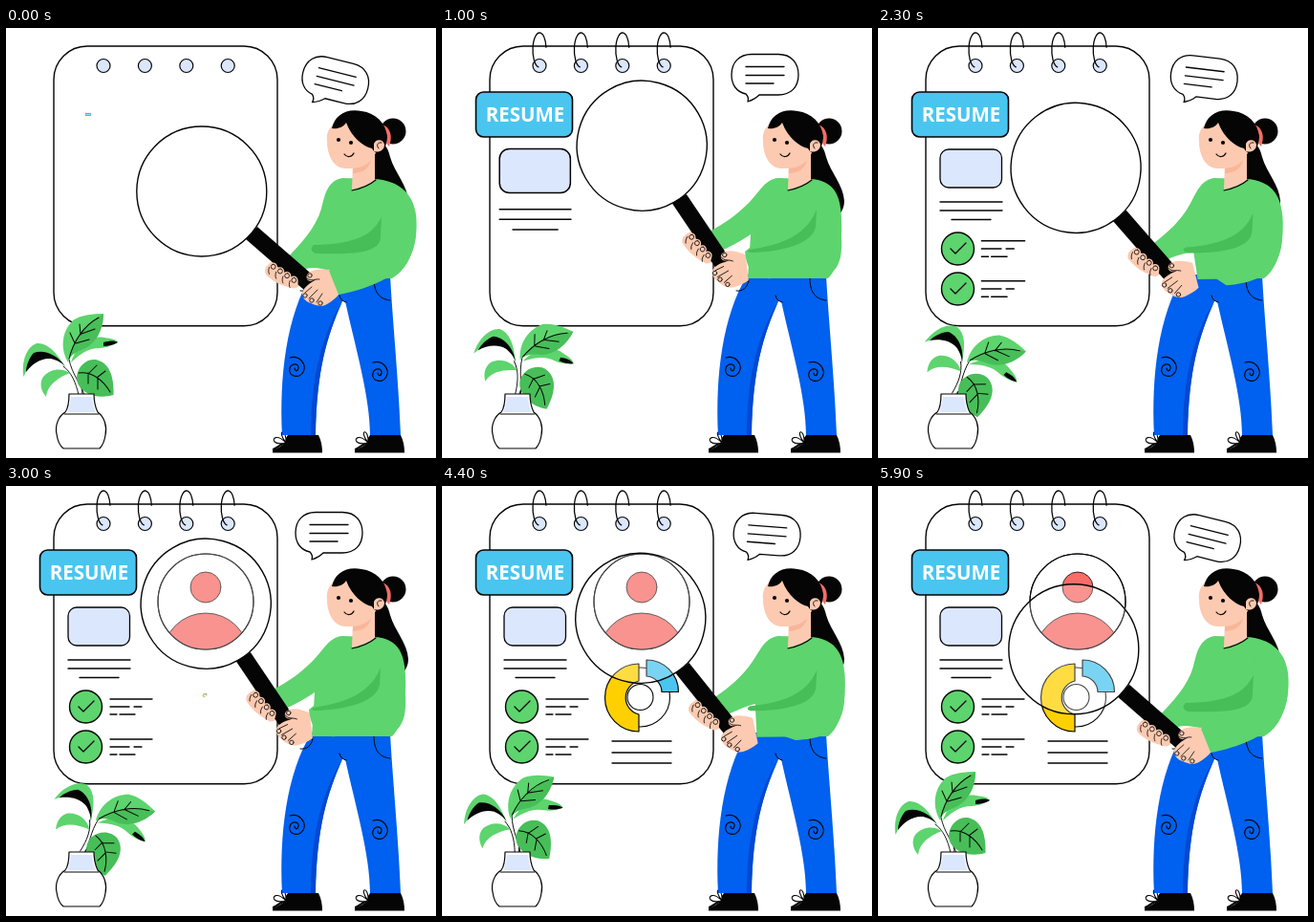
Recreate the animation shown at these times as an HTML page with a canvas. Size 450 by 450 pixels, loop 6000 ms.

```html
<!DOCTYPE html>
<html lang="en">
<head>
<meta charset="utf-8">
<title>Resume review</title>
<style>
html, body { margin: 0; width: 100%; height: 100%; overflow: hidden; background: #fff; }
canvas { display: block; width: 450px; height: 450px; }
</style>
</head>
<body>
<canvas id="stage" width="450" height="450"></canvas>
<script>
const ctx = document.getElementById('stage').getContext('2d');
const LOOP = 6000, TAU = Math.PI * 2, DEG = Math.PI / 180;
const INK = '#050505', GREEN = '#5dd46d', SHADE = '#47be58', SKIN = '#fccab1';
const BLUE = '#0060ef', SKY = '#4ac5f0', PALE = '#dbe7fd', RED = '#f76d68', YELLOW = '#ffd000';

const lerp = (a, b, k) => a + (b - a) * k;
const clamp = v => Math.min(1, Math.max(0, v));

// cubic-bezier(.25, .1, .25, 1), solved by bisection
function ease(x) {
  const curve = (p, q, s) => 3 * p * s * (1 - s) ** 2 + 3 * q * s * s * (1 - s) + s ** 3;
  let lo = 0, hi = 1;
  for (let i = 0; i < 20; i++) {
    const mid = (lo + hi) / 2;
    if (curve(.25, .25, mid) < x) lo = mid; else hi = mid;
  }
  return curve(.1, 1, lo);
}

// Alternates 0 -> 1 -> 0, easing each leg
function swing(t, leg) {
  const k = ease((t % leg) / leg);
  return Math.floor(t / leg) % 2 ? 1 - k : k;
}

function paint(path, fill, stroke, width = 1.3) {
  if (fill) { ctx.fillStyle = fill; ctx.fill(path); }
  if (stroke) { ctx.strokeStyle = stroke; ctx.lineWidth = width; ctx.stroke(path); }
}
const shape = (d, fill, stroke, width) => paint(new Path2D(d), fill, stroke, width);
const line = (d, width = 1.3) => shape(d, null, INK, width);

function circle(x, y, r, fill, stroke, width) {
  const p = new Path2D();
  p.arc(x, y, r, 0, TAU);
  paint(p, fill, stroke, width);
}

function box(x, y, w, h, r, fill, stroke, width) {
  const p = new Path2D();
  p.roundRect(x, y, w, h, r);
  paint(p, fill, stroke, width);
}

function group(draw) {
  ctx.save();
  draw();
  ctx.restore();
}

function turn(x, y, angle) {
  ctx.translate(x, y);
  ctx.rotate(angle);
  ctx.translate(-x, -y);
}

// Blends two path strings of the same structure
function morph(a, b, k) {
  const target = b.match(/[\d.]+/g);
  let i = 0;
  return a.replace(/[\d.]+/g, n => lerp(+n, +target[i++], k).toFixed(2));
}

// Scales in around a point, overshooting before it settles
function pop(t, start, x, y, draw) {
  if (t < start) return;
  const u = clamp((t - start) / 600), peak = 2 / 3;
  const s = u < peak
    ? Math.max(.06, 1.15 * ease(u / peak))
    : lerp(1.15, 1, ease((u - peak) / (1 - peak)));
  group(() => {
    ctx.translate(x, y);
    ctx.scale(s, s);
    ctx.translate(-x, -y);
    draw();
  });
}

function pad(t) {
  box(50, 19, 234, 292.7, 35, '#fff', INK, 1.4);
  const grown = ease(clamp(t / 600));
  for (let i = 0; i < 4; i++) {
    const x = 102 + i * 43.4;
    circle(x, 39.5, 7, PALE, INK, 1.2);
    if (grown < .03) continue;
    const ring = new Path2D();
    ring.ellipse(x, 23, 7, 18, 0, Math.PI * .55, Math.PI * (.55 + 1.4 * grown));
    paint(ring, null, INK, 1.3);
  }
}

function tab() {
  box(35.5, 67, 101, 47, 8, SKY, INK, 1.6);
  ctx.fillStyle = '#fff';
  ctx.font = 'bold 20.5px "Open Sans", sans-serif';
  ctx.textAlign = 'center';
  ctx.textBaseline = 'alphabetic';
  ctx.fillText('RESUME', 87, 97.5);
}

function summary() {
  box(65, 127, 64.5, 40, 9, PALE, INK, 1.3);
  line('M65 182H130M65 191H130M77 200.5H118');
}

function check(y) {
  circle(83.5, y, 17, GREEN, INK, 1.4);
  line(`M76 ${y}L81 ${y + 5}L92 ${y - 6}`, 1.3);
}

const checkLines = y =>
  line(`M109 ${y - 8}H153M109 ${y}H129M134 ${y}H142M109 ${y + 8}H116M119 ${y + 8}H135`);

function portrait() {
  circle(209, 121, 50, '#fff', INK, 1.1);
  circle(209, 106, 16, RED, INK, .8);
  group(() => {
    ctx.beginPath();
    ctx.arc(209, 121, 50, 0, TAU);
    ctx.clip();
    circle(209, 178, 45, RED, INK, .8);
  });
  circle(209, 121, 50, null, INK, 1.1);
}

function donut() {
  circle(207.5, 221, 31, '#fff', INK, 1.1);
  circle(207.5, 221, 13.5, '#fff', INK, 1.1);
  shape('M206 186A35.5 35.5 0 0 0 206 257V239A18 18 0 0 1 206 204Z', YELLOW, INK, 1.2);
  shape('M214 182A33.5 33.5 0 0 1 247.5 215.5H230A17 17 0 0 0 214 199Z', SKY, INK, 1.2);
}

// Runs its drawing in the moving frame of the magnifier
function held(k, draw) {
  group(() => {
    ctx.translate(4.4 * k, -47.8 * k);
    turn(204.8, 171, 15 * k * DEG);
    draw();
  });
}

const lens = () => circle(204.8, 171, 68, 'rgba(255,255,255,.26)', INK, 1.4);
const handle = () => shape('M251 221L263 208L325 262L313 275Z', INK);

function farHand() {
  shape('M294 241C286 242 278 243 274 248C270 252 270 257 274 260C281 266 292 272 303 272C308 271 309 265 307 258L309 254Z', SKIN);
}

function fingertips() {
  for (let i = 0; i < 4; i++) {
    const x = 279.5 + i * 7.2, y = 249.5 + i * 4.7;
    box(x - 4.5, y - 4, 9, 13, 4.5, SKIN);
    box(x - 2.2, y - 2.2, 4.8, 5, 2.4, SKIN, INK, .8);
    line(`M${x - 4} ${y + 1}C${x - 5} ${y + 4} ${x - 5} ${y + 6} ${x - 4} ${y + 8}`, .8);
  }
}

function nearHand() {
  shape('M339 253C331 252 322 252 317 256C313 259 314 265 319 265L325 263C318 267 312 271 310 277C310 282 313 286 319 288C325 291 331 292 336 289C341 286 345 283 349 278Z', SKIN);
  line('M315 262C319 266 324 262 328 263M313 277L320 271M317 283L326 274M325 287L331 278', .8);
  for (const [x, y] of [[318, 259], [313, 280], [320, 285], [329, 288]])
    circle(x, y, 2.2, SKIN, INK, .8);
}

function bubble(k) {
  group(() => {
    ctx.translate(lerp(6.5, 0, k), lerp(5.8, 0, k));
    turn(338, 50, lerp(14, 0, k) * DEG);
    shape('M324 27.5H352C366 27.5 373 37 373 49C373 62 365 70 352 70H332C329 73 325 75.5 320 77C321 74 320 71 318 69C308 67 303 59 303 49C303 36 311 27.5 324 27.5Z', '#fff', INK, 1.3);
    line('M318 40.5H358M318 49.5H358M318 58H347');
  });
}

function plant(k) {
  group(() => {
    turn(79, 385, 45 * k * DEG);
    line('M82 384C78 372 69 362 66 347M76 384C73 370 68 360 60 354M80 384C79 374 78 368 79 360', .9);
    shape('M68 350C74 332 88 321 103 324C111 325 115 326 117 329C110 333 104 335 98 335C86 335 78 341 68 350Z', GREEN);
    shape('M102 329C109 327 114 327 117 329C112 332 107 333 102 333Z', INK);
    shape('M65 350C56 334 59 317 70 306C79 300 91 299 102 299C102 315 94 331 81 336C73 339 67 342 65 350Z', GREEN);
    shape('M65 350C68 330 80 312 102 299C102 315 94 331 81 336C73 339 67 342 65 350Z', SHADE);
    line('M66 346C70 330 80 312 97 303M72 330L67 319M78 321L77 310M73 330L87 326M79 320L93 315', 1);
    shape('M62 355C53 339 43 329 32 330C21 334 16 350 18.5 365C24 351 36 341 47 345C54 347 58 350 62 355Z', GREEN);
    shape('M62 354C53 341 39 336 29 340C24 345 21 354 21 360C27 352 36 345 47 346C54 348 58 350 62 354Z', INK);
    shape('M67 361C57 355 46 357 39 365C35 371 36 379 42 386C43 374 54 366 67 361Z', GREEN);
    shape('M74 365C75 354 84 346 94 347C108 350 113 364 112.5 384C102 387 91 386 83 381C76 376 74 371 74 365Z', SHADE);
    line('M76 361C90 359 102 369 109 381M87 361L95 353M95 366L104 359M86 361L86 372M96 367L96 378', 1);
  });
  shape('M66 383H92C92 392 94 398 96 402C103 407 106 417 104 426C103 433 101 437 98 440H60C56 437 54 432 53 425C51 416 55 406 62 402C65 398 66 391 66 383Z', '#fff', INK, 1.2);
  shape('M68 386H90C91 393 92 398 94 402H64C66 398 67 392 68 386Z', PALE);
  line('M61 404H97', 1);
}

function shoe(x) {
  shape(`M${x} 444.5V440C${x + 5} 438 ${x + 11} 434 ${x + 16} 426H${x + 48}C${x + 51} 432 ${x + 52} 438 ${x + 52} 444.5Z`, INK);
  shape(`M${x + 14} 434C${x + 5} 425 ${x - 1} 429 ${x + 2} 433C${x + 5} 436 ${x + 10} 435 ${x + 14} 434C${x + 3} 420 ${x + 15} 418 ${x + 14} 434C${x + 9} 436 ${x + 5} 439 ${x + 2} 442`, '#fff', INK, 1.1);
}

const swirl = (x, y) =>
  line(`M${x - 7} ${y - 10}C${x + 4} ${y - 13} ${x + 11} ${y - 2} ${x + 7} ${y + 5}C${x + 2} ${y + 13} ${x - 9} ${y + 9} ${x - 7} ${y + 1}C${x - 5} ${y - 5} ${x + 3} ${y - 4} ${x + 2} ${y + 1}C${x + 1} ${y + 5} ${x - 2} ${y + 4} ${x - 2} ${y + 1}`, 1.2);

function legs() {
  shoe(279);
  shoe(365);
  shape('M320 258H402C404 300 411 370 413 426H381C381 386 366 336 355 286H352C336 322 325 358 324 426H289C286 366 293 301 320 258Z', BLUE);
  shape('M352 286C336 322 325 358 324 426H319C319 362 332 318 352 286Z', '#0048d2');
  line('M349 280C350 284 352 286 356 287M385 262C385 278 392 284 402 285M321 264C320 272 314 276 308 275', 1);
  swirl(304, 355);
  swirl(391, 360);
}

function backHair() {
  shape('M383 112C395 118 400 125 402 135C407 152 420 164 421 181C421 187 419 191 416 195L384 165Z', INK);
}

function head() {
  shape('M363 140L386 128V160C380 164 372 167 362 169Z', SKIN);
  shape('M363 146C371 147 378 143 382 138C380 147 373 152 363 152Z', '#f8b699');
  shape('M342 101C337 106 335 112 336 119C336 133 343 147 355 147C373 148 386 140 390 122L380 97Z', SKIN);
  circle(405, 108, 13.5, INK);
  shape('M394 101C402 104 405 113 401 124C397 121 394 112 394 101Z', RED);
  shape('M341 105C344 92 355 84 372 87C387 89 397 99 399 113C399 121 396 128 391 133C388 131 385 130 383 126C374 124 362 115 356 99C353 104 347 106 341 105Z', INK);
  shape('M385 121C388 115 395 117 396 122C396 128 390 131 385 129Z', SKIN);
  line('M393 120C389 119 387 123 390 126', .9);
  circle(348, 117, 2.1, INK);
  circle(361, 120, 2.1, INK);
  line('M354 132C357 136 362 135 364 131', 1.2);
}

function blouse(k) {
  shape(morph(
    'M352 157C335 160 333 178 330 189C324 210 308 226 294 241L308 255C315 250 325 250 338 254L350 264L404 262C425 250 432 220 429 195C426 172 410 160 387 158Z',
    'M352 157C338 158 332 172 322 182C310 194 296 205 281 212L290 234C304 228 314 222 323 216L320 262L404 262C417 250 419 220 418 198C417 172 408 160 387 158Z', k), GREEN);
}

function nearSleeve(k) {
  shape(morph(
    'M395 172C434 172 437 225 417 248C398 266 370 275 348 279L338 254C352 250 372 240 390 222Z',
    'M390 175C418 172 421 225 417 240C412 258 405 260 380 260C355 261 335 264 320 263L317 234C340 232 372 228 390 205Z', k), GREEN);
  shape(morph(
    'M393 198C384 215 370 226 322 227C318 230 319 235 325 236C365 237 394 236 392 216Z',
    'M392 190C382 215 360 226 322 232C319 233 319 235 325 235C355 234 388 226 391 208Z', k), SHADE);
}

function woman(k) {
  backHair();
  legs();
  blouse(k);
  head();
  line('M362 170C372 168 381 164 387 159', 1.2);
  held(k, () => {
    farHand();
    handle();
    fingertips();
    nearHand();
  });
  nearSleeve(k);
}

function render(t) {
  const k = swing(t, 1000);
  ctx.fillStyle = '#fff';
  ctx.fillRect(0, 0, 450, 450);
  ctx.lineCap = ctx.lineJoin = 'round';

  pad(t);
  pop(t, 0, 86, 90.5, tab);
  pop(t, 600, 97, 130, summary);
  for (const y of [231, 273]) {
    pop(t, 1200, 83.5, y, () => check(y));
    pop(t, 1800, 131, y, () => checkLines(y));
  }
  pop(t, 2400, 209, 121, portrait);
  pop(t, 3000, 208, 219, donut);
  pop(t, 3100, 209, 279, () => line('M178 267H240M178 279H240M178 290H240'));

  bubble(k);
  plant(swing(t, 3000));
  held(k, lens);
  woman(k);
}

function tick(now) {
  render(now % LOOP);
  requestAnimationFrame(tick);
}
render(0);
requestAnimationFrame(tick);
</script>
</body>
</html>
```
